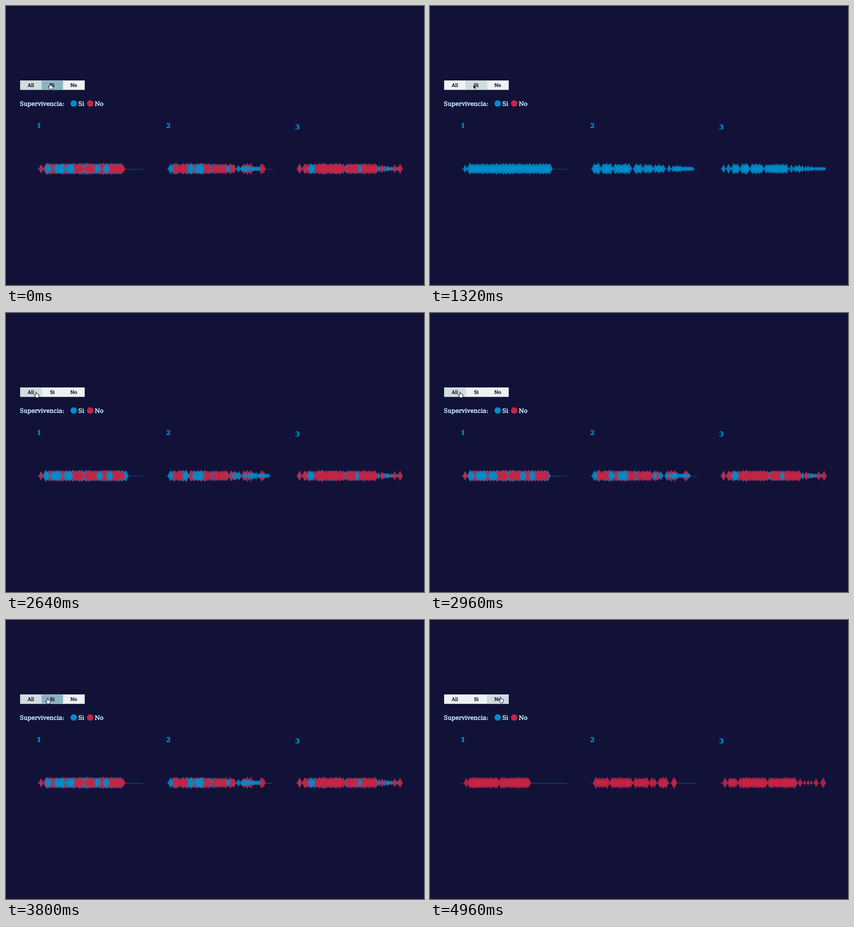
These frames come from a looping animation (917x611 px, 5 s). A matplotlib script:

```python
import numpy as np
import matplotlib.pyplot as plt
from matplotlib.animation import FuncAnimation
from matplotlib.collections import PolyCollection
from matplotlib.colors import to_rgba
from matplotlib.patches import Circle, Polygon, Rectangle
from matplotlib.patheffects import withStroke

W, H, DPI = 917, 611, 64
STEP, FRAMES = 40, 125
PT = 72 / DPI

BG, BLUE, RED = "#121239", "#008dcb", "#c62445"
PALE, INK = "#c8f0fb", "#15123a"
WHITE, ACTIVE, HOVER = "#f0f1f1", "#d1dddd", "#8ab3c0"

# Click times in ms and length of each rearrangement
CLICK_SI, CLICK_ALL, CLICK_NO, MOVE = 385, 2620, 4440, 750
AXIS_Y, AXIS_LEN, MAX_H, GAP = 356.5, 232, 13, 3.6

rng = np.random.default_rng(12)
fig = plt.figure(figsize=(W / DPI, H / DPI), dpi=DPI, facecolor=BG)
ax = fig.add_axes([0, 0, 1, 1])
ax.set_xlim(0, W)
ax.set_ylim(H, 0)
ax.axis("off")


def label(x, y, text, px, color, **kw):
    """Text with a hairline stroke that firms up the small type."""
    return ax.text(x, y, text, fontsize=px * PT, color=color, family="DejaVu Serif",
                   va="baseline", path_effects=[withStroke(linewidth=0.5, foreground=color)],
                   **kw)


def smooth(u):
    return (3 - 2 * u) * u * u


def ease(u):
    """Cubic in-out."""
    u = min(max(u, 0), 1)
    return 4 * u ** 3 if u < 0.5 else 1 - 4 * (1 - u) ** 3


def clusters(runs, left, tail):
    """Fill each stretch between neighbouring edges with diamonds.

    The height limit falls towards tail along the axis.
    """
    xs, hs = [], []
    for run in runs:
        for a, b in zip(run, run[1:]):
            u = ((a + b) / 2 - left) / AXIS_LEN
            h = min(MAX_H - (MAX_H - tail) * u ** 3, 0.95 * (b - a))
            half = 0.5 * h
            n = 1 + max(0, round((b - a - 2 * half) / GAP))
            x = np.linspace(a + half - 1, b - half + 1, n) if n > 1 else [(a + b) / 2]
            xs.extend(x)
            hs.extend(h * rng.uniform(0.84, 1, n) * np.where(np.arange(n) % 2, 0.86, 1))
    return np.array(xs), np.array(hs)


class Swarm:
    """Diamonds sharing one colour, moving between two layouts."""

    def __init__(self, start, end, heights, color):
        self.start, self.end, self.h = start, end, heights
        self.face = to_rgba(color, 0.85)
        self.edge = to_rgba(color, 0.95)

    def verts(self, p):
        x = self.start + p * (self.end - self.start)
        w, h = 0.5 * self.h + 0.4, self.h
        y = np.full_like(x, AXIS_Y)
        return list(np.stack([np.stack([x, y - h], 1), np.stack([x + w, y], 1),
                              np.stack([x, y + h], 1), np.stack([x - w, y], 1)], 1))


back, reds, front = [], [], []


def add_panel(left, name, base, tail, yes, spread, no, squeeze, tops):
    """Build one chart.

    yes, no: cluster edges; spread maps the filtered blues to the full layout,
    squeeze maps the full reds to the filtered one; blues within tops lie in front.
    """
    label(left - 0.5, base, name, 14, BLUE, weight="bold")
    ax.plot([left, left + AXIS_LEN], [AXIS_Y] * 2, color=BLUE, alpha=0.6, lw=PT, zorder=1)

    x, h = clusters(yes, left, tail)
    full = np.interp(x, *zip(*spread))
    top = np.any([(full >= a) & (full <= b) for a, b in tops], axis=0)
    for group, mask in ((back, ~top), (front, top)):
        group.append(Swarm(full[mask], x[mask], h[mask], BLUE))

    x, h = clusters(no, left, MAX_H)
    reds.append(Swarm(x, np.interp(x, *zip(*squeeze)), h, RED))


add_panel(68, "1", 267, 12,
          yes=[[72, 82, 268]],
          spread=[(77, 77), (105, 114), (182, 180), (261, 250)],
          no=[[72, 82, 172, 262]],
          squeeze=[(72, 76), (262, 215)],
          tops=[(86, 97), (110, 126), (134, 148), (198, 206), (219, 224)])

add_panel(352, "2", 267, 4,
          yes=[[355, 375, 401, 442], [447, 467, 490, 516], [519, 530, 552, 578]],
          spread=[(361, 361), (391, 404), (455, 446), (575, 556)],
          no=[[364, 400, 452, 488, 505], [516, 543], [555, 570]],
          squeeze=[(364, 358), (505, 497), (516, 499), (562, 533)],
          tops=[(355, 366), (402, 408), (419, 430), (483, 488), (503, 556)])

add_panel(635, "3", 270, 3,
          yes=[[639, 649, 661, 680, 702, 733, 786], [788, 798, 814],
               [814, 827, 838, 867]],
          spread=[(644, 645), (684, 687), (739, 748), (864, 862)],
          no=[[638, 650, 675, 745, 815], [820, 830, 836, 842, 847, 858, 871]],
          squeeze=[(638, 642), (815, 804), (826, 811), (871, 871)],
          tops=[(657, 673), (776, 779), (836, 845)])

diamonds = ax.add_collection(PolyCollection([], linewidths=0.7, zorder=2))

# Filter buttons
LEFT, TOP, WIDTH, HEIGHT = 31, 163, 47, 20
buttons = []
for i, name in enumerate(["All", "Si", "No"]):
    x = LEFT + i * WIDTH
    buttons.append(ax.add_patch(Rectangle((x, TOP), WIDTH, HEIGHT, lw=0, zorder=3)))
    label(x + WIDTH / 2, 177, name, 10, INK, ha="center", zorder=5)
    if i:
        ax.plot([x + 0.5] * 2, [TOP, TOP + HEIGHT], color="#a9c9cf", lw=0.8,
                ls=":", zorder=4)
ax.add_patch(Rectangle((LEFT, TOP), 3 * WIDTH, HEIGHT, fill=False, ec="#d8ecf0",
                       lw=0.8, joinstyle="round", zorder=4))

# Legend
label(30, 218.5, "Supervivencia:", 13, PALE)
for x, name, color in ((148.5, "Si", BLUE), (184.7, "No", RED)):
    ax.add_patch(Circle((x, 213.5), 7, fc=color, lw=0))
    label(x + 10, 218.5, name, 13, PALE)

# Pointer shapes, relative to the hot spot
ARROW = np.array([(0, 0), (0, 9.5), (2.2, 7.6), (3.8, 11), (5.4, 10.2),
                  (4, 7), (7, 7)])
HAND = np.array([(-0.8, 0), (0.8, 0.2), (1.4, 4), (6, 5), (6.6, 6.6),
                 (4.8, 12.4), (-0.2, 12.4), (-4, 6.8), (-3, 5.8), (-1.2, 7)])
arrow = ax.add_patch(Polygon(ARROW, fc="#0c0b22", ec="#f4f6f8", lw=0.5, zorder=7))
hand = ax.add_patch(Polygon(HAND, fc="#f4f6f8", ec=INK, lw=1.1, zorder=7))

# Pointer path: time, x, y
PATH = [(0, 96.5, 170), (1240, 97, 171.5), (1760, 66, 173), (2980, 66, 173),
        (3360, 68.5, 172), (3600, 68.5, 172), (4200, 155, 169), (5000, 155, 169)]


def pointer_at(t):
    for (t0, *a), (t1, *b) in zip(PATH, PATH[1:]):
        if t0 <= t < t1:
            return np.array(a) + smooth((t - t0) / (t1 - t0)) * np.subtract(b, a)


def active_button(t):
    if t < CLICK_SI or CLICK_ALL <= t < CLICK_NO:
        return 0
    return 1 if t < CLICK_ALL else 2


def draw_diamonds(t):
    p = ease((t - CLICK_SI) / MOVE) - ease((t - CLICK_ALL) / MOVE)
    q = ease((t - CLICK_NO) / MOVE)
    active = active_button(t)
    layers = []
    if active != 2:
        layers += [(s, p) for s in back]
    if active != 1:
        layers += [(s, q) for s in reds]
    if active != 2:
        layers += [(s, p) for s in front]
    verts, faces, edges = [], [], []
    for swarm, progress in layers:
        verts += swarm.verts(progress)
        faces += [swarm.face] * len(swarm.h)
        edges += [swarm.edge] * len(swarm.h)
    diamonds.set_verts(verts)
    diamonds.set_facecolor(faces)
    diamonds.set_edgecolor(edges)


def draw_controls(t):
    pos = pointer_at(t)
    active, hovered = active_button(t), int((pos[0] - LEFT) // WIDTH)
    for i, box in enumerate(buttons):
        box.set_facecolor(ACTIVE if i == active else HOVER if i == hovered else WHITE)
    is_arrow = 640 <= t < 1480 or 3160 <= t < 3760
    arrow.set_visible(is_arrow)
    hand.set_visible(not is_arrow)
    arrow.set_xy(ARROW + pos)
    hand.set_xy(HAND + pos)


def update(i):
    draw_diamonds(i * STEP)
    draw_controls(i * STEP)
    return diamonds, arrow, hand, *buttons


anim = FuncAnimation(fig, update, frames=FRAMES, interval=STEP,
                     repeat=True, repeat_delay=0, blit=False)
plt.show()
```
